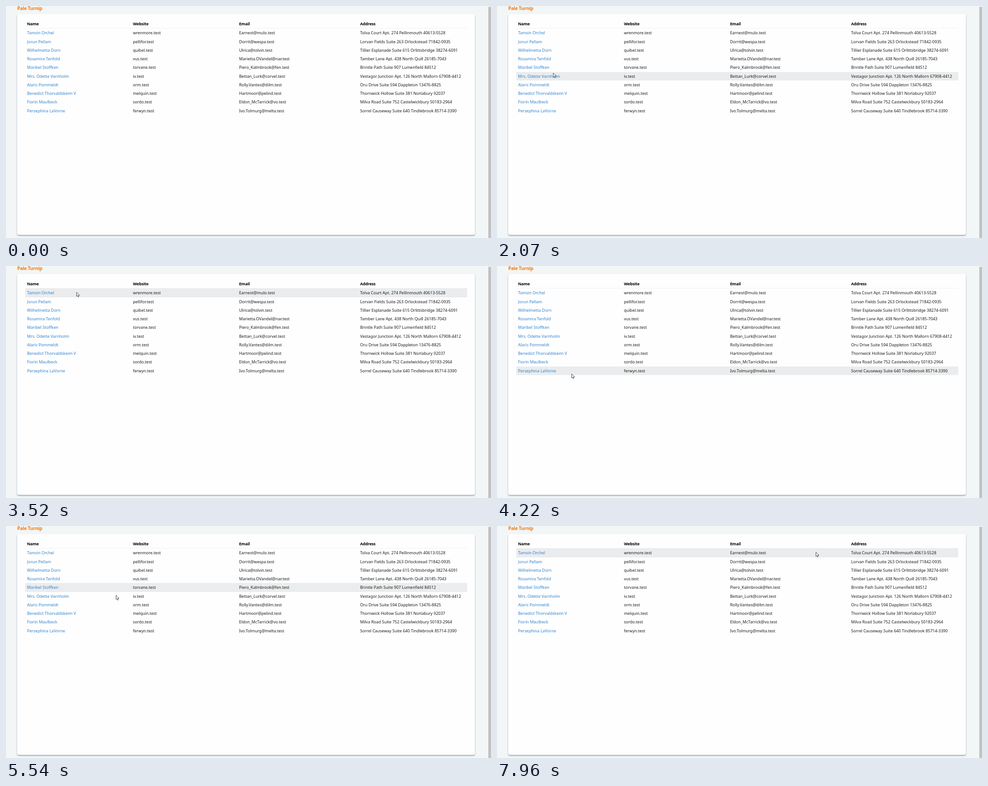
Write an HTML page that moves like this. It is 1082x517 px and loops after 8 s.

```html
<!DOCTYPE html>
<html lang="en">
<head>
<meta charset="utf-8">
<title>Contact table</title>
<style>
  html, body { margin: 0; width: 100%; height: 100%; overflow: hidden; }
  body {
    position: relative;
    background: #f2f6f7;
    color: #1c1c1c;
    font: 9px/19.26px "Noto Sans", "Open Sans", sans-serif;
    white-space: nowrap;
  }
  h1 {
    position: absolute; left: 25px; top: -4px; margin: 0;
    color: #ee7b11; font-size: 10.5px; font-weight: 600; line-height: 19px;
    letter-spacing: -.3px;
  }
  .card {
    position: absolute; left: 25px; top: 18px; width: 1021px; height: 492px;
    border-radius: 4px; background: #fefefe;
    box-shadow: 0 2px 3px rgba(70, 90, 115, .5);
  }
  .row { position: absolute; left: 42.5px; width: 986px; height: 19.26px; }
  .row span { position: absolute; top: 0; }
  .row span:first-child { color: #3182ce; font-weight: 500; }
  .row.head span { color: #000; font-weight: 600; letter-spacing: -.2px; }
  .row.lit { background: #eaeced; }
  .rule { position: absolute; left: 42.5px; top: 49px; width: 986px; height: 1px; background: #eef2f5; }
  .scroll { position: absolute; left: 1076px; top: 0; width: 6px; height: 517px; background: #f1f1f1; }
  .scroll::after { content: ""; position: absolute; inset: 2px 0 0; background: #c1c1c1; }
  #cursor { position: absolute; left: 0; top: 0; overflow: visible; }
</style>
</head>
<body>
<h1>Pale Turnip</h1>
<div class="card"></div>
<div class="rule"></div>
<div id="table"></div>
<div class="scroll"></div>
<svg id="cursor" width="8" height="12">
  <path d="M.5 .5V9.6L2.6 7.7 4.1 11.2 5.7 10.5 4.2 7.2H7.2Z" fill="#fff" stroke="#33333f" stroke-width=".9"/>
</svg>
<script>
const LOOP = 8000, STEP = 68.9, ENTER = 850;
const ROW_TOP = 50.4, ROW_HEIGHT = 19.26;
const COLUMNS = [4.5, 240.7, 477.5, 747.5];

const people = [
  ["Tamsin Orchel", "wrenmore.test", "Earnest@mulo.test", "Tolva Court Apt. 274 Pellinmouth 40613-5528"],
  ["Jorun Pellam", "pellifor.test", "Dorrit@wespa.test", "Lorvan Fields Suite 263 Orlockstead 71842-0935"],
  ["Wilhelmetta Dorn", "quibel.test", "Ulrica@tolvin.test", "Tillier Esplanade Suite 615 Orlittsbridge 38274-6091"],
  ["Rosamira Tenfold", "vus.test", "Marietta.OVandel@nar.test", "Tamber Lane Apt. 438 North Quill 26185-7043"],
  ["Maribel Stoffken", "torvane.test", "Piero_Kalmbrook@fen.test", "Brintle Path Suite 907 Lumenfield 84512"],
  ["Mrs. Odette Varnholm", "iv.test", "Bettan_Lurk@corvel.test", "Vestagor Junction Apt. 126 North Mallorn 67908-4412"],
  ["Alaric Pommeldt", "orm.test", "Rolly.Vantes@dilm.test", "Oru Drive Suite 594 Dappleton 13476-8825"],
  ["Benedict Thorvaldskeim V", "melquin.test", "Hartmoor@pelind.test", "Thornwick Hollow Suite 381 Norlabury 92037"],
  ["Fiorin Maulbeck", "sordo.test", "Eldon_McTarrick@vo.test", "Milva Road Suite 752 Castelwickbury 50183-2964"],
  ["Persephina LaVorne", "ferwyn.test", "Ivo.Tolmurg@melta.test", "Sorrel Causeway Suite 640 Tindlebrook 85714-3390"]
];

// Turning points of the pointer: time, x, y
const path = [
  [ENTER, 1002, 508], [1590, 772, 320], [2065, 125, 149], [2250, 0, 225],
  [2420, 28, 303], [3260, 140, 104], [3510, 157, 58], [4200, 166, 240],
  [4360, 170, 257], [5150, 222, 56], [5510, 245, 154], [5900, 205, 242],
  [6180, 196, 238], [6340, 203, 46], [6980, 246, 32], [7920, 711, 58]
];

const table = document.getElementById("table");
const cursor = document.getElementById("cursor");

function addRow(cells, top, className) {
  const row = document.createElement("div");
  row.className = className;
  row.style.top = top + "px";
  cells.forEach((text, i) => {
    const cell = document.createElement("span");
    cell.textContent = text;
    cell.style.left = COLUMNS[i] + "px";
    row.append(cell);
  });
  table.append(row);
  return row;
}

addRow(["Name", "Website", "Email", "Address"], 30, "row head");
const rows = people.map((cells, i) => addRow(cells, ROW_TOP + i * ROW_HEIGHT, "row"));

const ease = k => k * k * (3 - 2 * k);

function pointAt(t) {
  const to = path.find(p => p[0] > t) ?? path.at(-1);
  const from = path.findLast(p => p[0] <= t) ?? path[0];
  const k = to === from ? 0 : ease((t - from[0]) / (to[0] - from[0]));
  return [1, 2].map(i => from[i] + (to[i] - from[i]) * k);
}

function draw(now) {
  const t = Math.floor((now % LOOP) / STEP) * STEP;
  const shown = t >= ENTER;
  const [x, y] = pointAt(t).map(Math.round);
  cursor.style.visibility = shown ? "visible" : "hidden";
  cursor.style.transform = `translate(${x}px, ${y}px)`;

  // The hover colour trails the pointer by one step.
  const [hoverX, hoverY] = pointAt(t - STEP);
  const inside = shown && hoverX > 42 && hoverX < 1029;
  const lit = inside ? Math.floor((hoverY - ROW_TOP) / ROW_HEIGHT) : -1;
  rows.forEach((row, i) => row.classList.toggle("lit", i === lit));
}

const begin = performance.now();
function tick() {
  draw(performance.now() - begin);
  requestAnimationFrame(tick);
}
tick();
</script>
</body>
</html>
```
